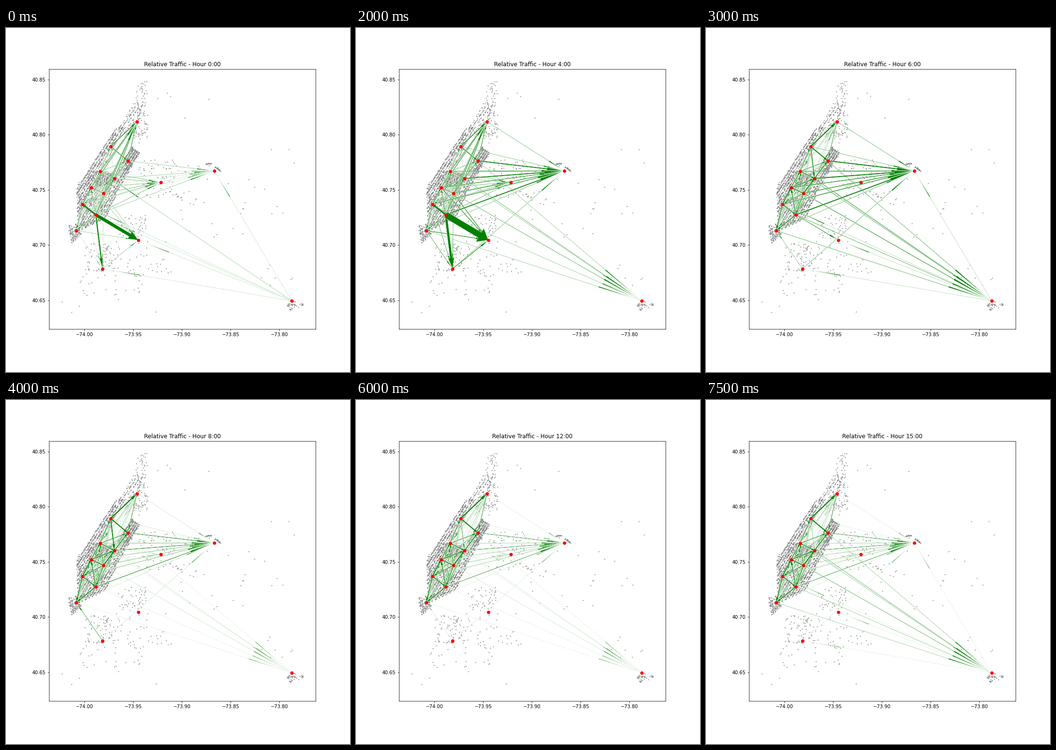
A matplotlib script that plays this animation: 720x720 px, repeating every 8000 ms.

```python
import numpy as np
import matplotlib.pyplot as plt
from matplotlib.animation import FuncAnimation
from matplotlib.path import Path

EDGE = 0.6

# Hubs in stage pixels
HUBS = dict(
    HA=(274, 196), UW=(219, 248), UE=(255, 278), LW=(197, 300), ME=(227, 315),
    CH=(178, 334), MU=(204, 346), WV=(160, 369), EV=(188, 391), FD=(147, 424),
    WB=(277, 444), BK=(202, 504), AS=(324, 323), LG=(436, 299), JF=(598, 571))
HUBS = {k: np.array(p, float) for k, p in HUBS.items()}
ISLAND = list(HUBS)[:10]

rng = np.random.default_rng(7)


# Daily rhythms, each about 0..1 over the hour h
def bump(h, peak, rise, fall):
    return np.exp(-((h - peak) / (rise if h < peak else fall)) ** 2)


def day(h):
    return 1 / (1 + np.exp(-1.5 * (h - 5)))


def party(h):
    return bump(h, 3.4, 4, 1.7)


def late(h):
    return 0.35 + 0.65 * bump(h, 3, 5, 1.8)


def early(h):
    return 0.65 + 0.35 * day(h)


def commute(h):
    return bump(h, 7, 2, 6)


def flights(h):
    return 0.35 + 0.6 * bump(h, 4.8, 1.8, 2.2) + 0.15 * day(h)


def long_haul(h):
    return (0.15 + 0.85 * bump(h, 5, 1.8, 2) + 0.25 * day(h)
            + 0.45 * bump(h, 16, 3, 3))


def arrivals(h):
    return (bump(h, -0.5, 1.5, 1.5) + bump(h, 6, 1.3, 1.3)
            + 0.7 * bump(h, 15, 4, 4))


flows = {}


def route(sources, targets, peak, rhythm):
    for a in sources.split():
        for b in targets.split():
            flows[a, b] = peak, rhythm


# Short trips inside the island are the busiest
for a in ISLAND:
    for b in ISLAND:
        if a != b:
            d = np.linalg.norm(HUBS[a] - HUBS[b])
            peak = 0.4 + 3 * np.exp(-d / 75) * rng.uniform(0.5, 1.2)
            route(a, b, peak, early)

route("CH MU WV FD BK", "WB", 1.9, party)
route("EV", "WB", 15, party)
route("MU WV CH FD", "BK", 1.4, party)
route("EV", "BK", 5.8, party)
route("EV", "WV", 4.6, late)
route("WV EV", "FD", 2.2, early)
route("BK", "FD", 1.3, commute)
route("UE LW ME CH MU EV", "HA", 1.9, late)
route("UW", "HA", 2.9, early)
route("UW", "ME", 2.6, commute)
route("UW", "UE", 2.6, early)
route("CH MU WV EV LW ME", "AS", 1.35, late)
route("HA UW FD BK", "LG", 1.2, flights)
route("LW MU CH WV", "LG", 1.9, flights)
route("UE ME EV", "LG", 2.7, flights)
route("UW EV FD LW", "JF", 1.15, long_haul)
route("ME MU", "JF", 1.45, long_haul)
route("JF", "WB BK WV LG EV", 0.8, arrivals)
route("JF", "LW", 1, arrivals)


# Pickup points
AXES = np.array(((0.543, -0.840), (0.903, 0.429)))  # avenue, street


def fill(corners, n, step=0):
    """n random points in a polygon, optionally pulled onto avenues."""
    c = np.array(corners, float)
    p = rng.uniform(c.min(0), c.max(0), (n * 12, 2))
    if step:
        uv = p @ np.linalg.inv(AXES)
        uv[:, 1] = np.round(uv[:, 1] / step) * step
        uv[:, 1] += rng.normal(0, 0.7, len(uv))
        p = uv @ AXES
    return p[Path(c).contains_points(p)][:n]


def box(x0, y0, x1, y1, n):
    return rng.uniform((x0, y0), (x1, y1), (n, 2))


def blob(x, y, sx, sy, n):
    return rng.normal((x, y), (sx, sy), (n, 2))


def line(x0, y0, x1, y1, n):
    return np.linspace((x0, y0), (x1, y1), n) + rng.normal(0, 0.8, (n, 2))


dots = np.vstack([
    # island, south to north
    fill([(128, 414), (147, 408), (158, 430), (137, 451)], 125),
    fill([(147, 332), (176, 290), (246, 318), (206, 400), (150, 425)],
         1700, 4.5),
    fill([(190, 298), (228, 303), (234, 320), (185, 335)], 420, 3),
    fill([(176, 290), (235, 203), (246, 212), (200, 298)], 400, 5),
    fill([(228, 304), (262, 246), (280, 262), (246, 318)], 520, 4.5),
    fill([(235, 203), (276, 150), (284, 185), (256, 240)], 130, 5),
    fill([(262, 165), (279, 110), (294, 112), (298, 232), (270, 245)], 100),
    # east and south of the river
    box(275, 275, 360, 355, 75), box(360, 280, 430, 370, 17),
    box(235, 392, 292, 440, 50), box(165, 450, 225, 510, 75),
    box(225, 442, 345, 520, 42), box(160, 510, 290, 560, 24),
    # airports
    line(418, 284, 429, 283, 18), line(438, 291, 448, 298, 22),
    blob(602, 578, 6, 3, 22), blob(596, 588, 1.2, 2, 10),
    blob(619, 579, 1.5, 1.5, 9), blob(591, 580, 1.5, 2, 7),
    # strays
    box(310, 135, 440, 200, 5), box(460, 250, 625, 420, 12),
    box(360, 355, 500, 440, 11), box(528, 480, 616, 550, 8),
    box(115, 510, 345, 605, 9)])

fig = plt.figure(figsize=(10, 10), dpi=72, facecolor="white")
ax = fig.add_axes((0.125, 0.125, 0.775, 0.755))
ax.set_xlim(90, 648)
ax.set_ylim(630, 86.4)
ax.set_xticks([163.9 + 102 * k for k in range(5)],
              [f"\u2212{74 - 0.05 * k:.2f}" for k in range(5)])
ax.set_yticks([569.9 - 115.6 * k for k in range(5)],
              [f"{40.65 + 0.05 * k:.2f}" for k in range(5)])
title = ax.set_title("")

ax.plot(*dots.T, "o", color="gray", ms=1, mew=1, zorder=1)
ax.plot(*np.array(list(HUBS.values())).T, "ro", ms=6, zorder=3)

arrows = []


def draw(hour):
    title.set_text(f"Relative Traffic - Hour {hour}:00")
    while arrows:
        arrows.pop().remove()
    widths = {k: peak * rhythm(hour) for k, (peak, rhythm) in flows.items()}
    # Busier routes lie on top
    for (a, b), w in sorted(widths.items(), key=lambda item: item[1]):
        if w < 0.45:
            continue
        d = HUBS[b] - HUBS[a]
        arrows.append(ax.arrow(
            *HUBS[a], *d, width=w, head_width=2.5 * w,
            head_length=0.2 * np.hypot(*d), length_includes_head=True,
            fc="green", ec="white", lw=EDGE, zorder=2))
    return arrows


anim = FuncAnimation(fig, draw, frames=16, interval=500, repeat=True,
                     repeat_delay=0, init_func=lambda: draw(0))
plt.show()
```
